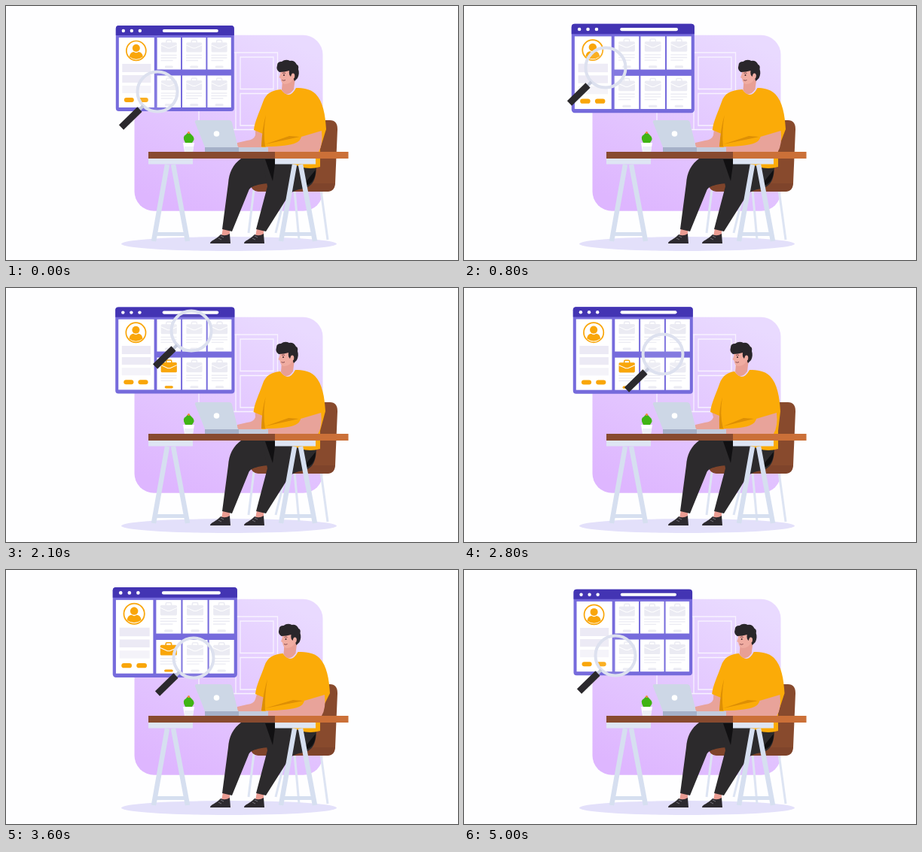
These frames come from a looping animation (600x338 px, 5.1 s). An HTML page:

```html
<!DOCTYPE html>
<html lang="en">
<head>
<meta charset="utf-8">
<title>Reviewing candidates</title>
<style>
html, body { margin: 0; width: 100%; height: 100%; overflow: hidden; background: #fefeff; }
svg { display: block; width: 100vw; height: 100vh; }
</style>
</head>
<body>
<svg viewBox="0 0 600 338">
  <defs>
    <linearGradient id="wall" x1=".75" y1="0" x2=".25" y2="1">
      <stop offset="0" stop-color="#e9daff"/>
      <stop offset="1" stop-color="#deb6ff"/>
    </linearGradient>
    <g id="trestle" fill="none" stroke="#d6dff0" stroke-width="6.5">
      <path d="M-4 7L-22 109M4 7L23 109"/>
      <path d="M-21 99.500H22" stroke-width="5"/>
    </g>
    <g id="shoe">
      <path d="M17 -7H26V3H15Z" fill="#ea9c92"/>
      <path d="M0 13C0 9 8 8 14 1Q20 4 26 0L27 13Z" fill="#2d2a2f"/>
      <path d="M11 6L15 8M14 3L18 5" stroke="#77747c"/>
    </g>
    <g id="case">
      <path d="M7 1V-1.5Q7 -3 8.500 -3H12.500Q14 -3 14 -1.500V1" fill="none" stroke="currentColor" stroke-width="1.500"/>
      <rect width="21" height="13" rx="1.500" fill="currentColor"/>
      <path d="M0 3.500L9 7.500H12L21 3.500" fill="none" stroke="#fff"/>
      <rect x="5" y="31" width="11" height="3" rx="1.500" fill="currentColor"/>
    </g>
  </defs>

  <rect x="170.500" y="38.800" width="250" height="234" rx="26" fill="url(#wall)"/>
  <g fill="none" stroke="#f8f2ff" stroke-width="1.300">
    <path d="M256 62H360.500V164.500H256ZM305 62V164.500"/>
    <path d="M311 68H355V110.500H311ZM311 116.500H355V159H311Z"/>
  </g>
  <ellipse cx="296" cy="316.500" rx="143" ry="9.500" fill="#e3e0fa"/>

  <g id="panel">
    <rect x="146" y="26" width="157" height="114" rx="4" fill="#766bdc"/>
    <path d="M146 39V30Q146 26 150 26H299Q303 26 303 30V39Z" fill="#4334b3"/>
    <g fill="#fff">
      <circle cx="156" cy="33" r="2.200"/><circle cx="167" cy="33" r="2.200"/><circle cx="178" cy="33" r="2.200"/>
      <rect x="208" y="31" width="74" height="4" rx="2"/>
      <rect x="150" y="42" width="47" height="93"/>
    </g>
    <g fill="#eceaf5">
      <rect x="154.500" y="77" width="38" height="11"/>
      <rect x="154.500" y="92" width="38" height="10"/>
      <rect x="154.500" y="106" width="38" height="10" opacity=".55"/>
    </g>
    <g fill="#f9a60a">
      <circle cx="173" cy="59.500" r="13" fill="#fff" stroke="#f9a60a" stroke-width="1.700"/>
      <circle cx="173" cy="56" r="5"/>
      <path d="M164 67.500Q165 61 170 61Q173 63.500 176 61Q181 61 182 67.500Q173 74 164 67.500Z"/>
      <rect x="157" y="122" width="13" height="6" rx="3"/>
      <rect x="176" y="122" width="13" height="6" rx="3"/>
    </g>
    <g id="docs"></g>
    <use id="found" href="#case" x="206" y="99" color="#f9a60a"/>
  </g>

  <g id="lens">
    <circle r="26.500" fill="#fff" fill-opacity=".1" stroke="#dde1ef" stroke-width="4"/>
    <path d="M-19 19L-25 25" stroke="#c5cbdc" stroke-width="4"/>
    <path d="M-23.500 23.500L-48 47.500" stroke="#2b292d" stroke-width="8.800"/>
  </g>

  <!-- chair -->
  <g fill="none" stroke="#dde4f3" stroke-width="3">
    <path d="M329 245L322 302M372 245L358 302M383 245L389 311M418 245L427 311"/>
  </g>
  <path d="M414 152H430Q440 152 440 164L437 236Q436 247 427 247H336Q326 247 324 236H400Z" fill="#884a2d"/>
  <path d="M324 236H437Q436 247 427 247H336Q326 247 324 236Z" fill="#7f442b"/>

  <!-- legs -->
  <use href="#shoe" x="271" y="303"/>
  <use href="#shoe" x="316" y="303"/>
  <g fill="#2c2a2c">
    <path d="M312 203C301 211 296 222 295 236L287 297L300 300L322 246C325 239 334 237 358 235V203Z"/>
    <path d="M340 203H412C413 232 408 242 389 244Q379 246 374 254L345 300L332 297L347 240Z"/>
    <path d="M344 204L354 233L358 204ZM393 240L411 218Q411 238 393 240Z" fill="#111012"/>
  </g>

  <path id="farArm" fill="#e8a39a"/>
  <path id="shirt" fill="#fbab08"/>
  <path id="crease" fill="#dd8f05"/>
  <path id="nearArm" fill="#e8a39a"/>
  <g id="head">
    <path d="M367 98L366 112Q373 123 382 111L384 95Z" fill="#e89f95"/>
    <path d="M365 84L364 91L362.500 95L364.500 96.500Q365 103 370 104Q378 104 381 97L383 84Z" fill="#f0aca1"/>
    <path d="M363 88Q358 85 360 79Q360 74 366 74Q371 70 377 73Q383 72 386 78Q389 79 388 84Q390 90 387 96L383 100Q381 97 383 92Q380 88 378 94Q375 91 376 86Q370 88 363 88Z" fill="#29262a"/>
    <ellipse cx="381" cy="93" rx="2.300" ry="3.500" fill="#f0aca1"/>
    <circle cx="369" cy="92" r="1" fill="#3a2428"/>
    <path d="M367 89.500Q369 88.500 371 89.500M366.500 98.500Q368.500 100 371 98.500" fill="none" stroke="#6b3038" stroke-width=".8"/>
  </g>

  <!-- laptop and plant -->
  <path d="M253 152H296Q299 152 300 155L308 188H264L251 155Q250 152 253 152Z" fill="#cdd7e6"/>
  <circle cx="279.500" cy="170" r="3.800" fill="#fff"/>
  <path d="M264 188H309V194H264Z" fill="#a5b0c8"/>
  <path d="M309 188H348V194H309Z" fill="#c3cbdd"/>
  <path d="M235 182H250L248 194H237Z" fill="#fff"/>
  <path d="M237 187H249L248 194H237.500Z" fill="#edf0f7"/>
  <path d="M238 182Q233 174 239 171Q240 169 243 168Q245 170 247 172Q252 176 247 182Z" fill="#40b414"/>
  <circle cx="242.500" cy="168.500" r="1.600" fill="#ee8a3c"/>

  <!-- table -->
  <use href="#trestle" x="218" y="204"/>
  <use href="#trestle" x="387" y="204"/>
  <path d="M189 203H248V210.500H189ZM357 203H411V210.500H357Z" fill="#dee5f4"/>
  <path d="M189 194H358V203H189Z" fill="#884a2f"/>
  <path d="M357 194H454.500V203H357Z" fill="#cb7038"/>
</svg>
<script>
const LOOP = 5100, STEP = 100, PULSE = 2400;
const el = id => document.getElementById(id);

// time, lens x, lens y, shoulder shift, head shift
const keys = [
  [0, 201, 114, 0, 0],
  [800, 188, 82, 2, 4.5],
  [1700, 235, 50, 1, 2],
  [2100, 246, 57, -1, -1],
  [2800, 264, 88, -5, -6],
  [3600, 249, 117, 5, 2.5],
  [4200, 228, 123, 2, 2],
  [5000, 201, 114, 0.5, -0.3]
];

// Key at any index, wrapped around the loop
function keyAt(i) {
  const n = keys.length, turn = Math.floor(i / n);
  const [time, ...values] = keys[i - turn * n];
  return [time + turn * LOOP, ...values];
}

// Smooth curve through the keys
function pose(t) {
  let i = keys.length - 1;
  while (keys[i][0] > t) i--;
  const [a, b, c, d] = [-1, 0, 1, 2].map(k => keyAt(i + k));
  const span = c[0] - b[0], u = (t - b[0]) / span, v = 1 - u;
  return [1, 2, 3, 4].map(k => {
    const into = (c[k] - a[k]) / (c[0] - a[0]) * span;
    const out = (d[k] - b[k]) / (d[0] - b[0]) * span;
    return b[k] * v * v * (1 + 2 * u) + c[k] * u * u * (3 - 2 * u)
      + into * u * v * v - out * u * u * v;
  });
}

const ramp = (t, from, to) => Math.min(1, Math.max(0, (t - from) / (to - from)));

el('docs').innerHTML = [42, 92.5].map(y => [200.8, 234.2, 267.6].map(x => `
  <g transform="translate(${x} ${y})">
    <rect width="31.400" height="42.500" fill="#fff"/>
    <use href="#case" x="5.200" y="6.500" color="#ebebf3"/>
    <path d="M5 23.500H26M5 27H26M5 30.500H21" stroke="#ebebf3" stroke-width="1.300"/>
  </g>`).join('')).join('');

function drawBody(s, h) {
  const l = s * 0.4, elbow = s * 0.8;
  el('head').setAttribute('transform', `translate(${h} 0)`);
  el('farArm').setAttribute('d',
    `M${331 + l} 165L342 169V188H309Q305 186 307 182L320 179Q329 178 331 172Z`);
  el('shirt').setAttribute('d',
    `M${365 + h} 111C${353 + l} 112 ${345 + l} 116 ${341 + l} 128
     C${336 + l} 142 ${330 + l} 154 ${329 + l} 165L${341 + l} 170L339 187L345 194L358 203L391 214
     Q404 218 417 214V190L${425 + s} 164C${424 + s} 146 ${421 + s} 127 ${411 + s} 117
     C${404 + s} 110 ${394 + s} 109 ${385 + h} 109Q${376 + h} 126 ${365 + h} 111Z`);
  el('crease').setAttribute('d',
    `M${345 + l} 145Q${340 + l} 162 339 187L344 187Q${341 + l} 168 ${345 + l} 145Z
     M344 184L${390 + s} 174L${376 + s} 173Z`);
  el('nearArm').setAttribute('d',
    `M${392 + elbow} 174L${419 + elbow} 166Q${421 + elbow} 184 ${415 + elbow} 194
     H341L345 187Q${374 + l} 187 ${385 + elbow} 182Q${391 + elbow} 179 ${392 + elbow} 174Z`);
}

function draw(now) {
  const t = Math.floor(now % LOOP / STEP) * STEP;
  const [x, y, shoulder, head] = pose(t);
  const scale = 1 + 0.026 * (1 - Math.cos(2 * Math.PI * t / PULSE));
  el('panel').setAttribute('transform',
    `translate(224.3 83) scale(${scale}) translate(-224.5 -83)`);
  el('lens').setAttribute('transform', `translate(${x} ${y})`);
  el('found').setAttribute('opacity', ramp(t, 1200, 1500) - ramp(t, 4400, 4800));
  drawBody(shoulder, head);
}

let start;
function tick(now) {
  start ??= now;
  draw(now - start);
  requestAnimationFrame(tick);
}
draw(0);
requestAnimationFrame(tick);
</script>
</body>
</html>
```
